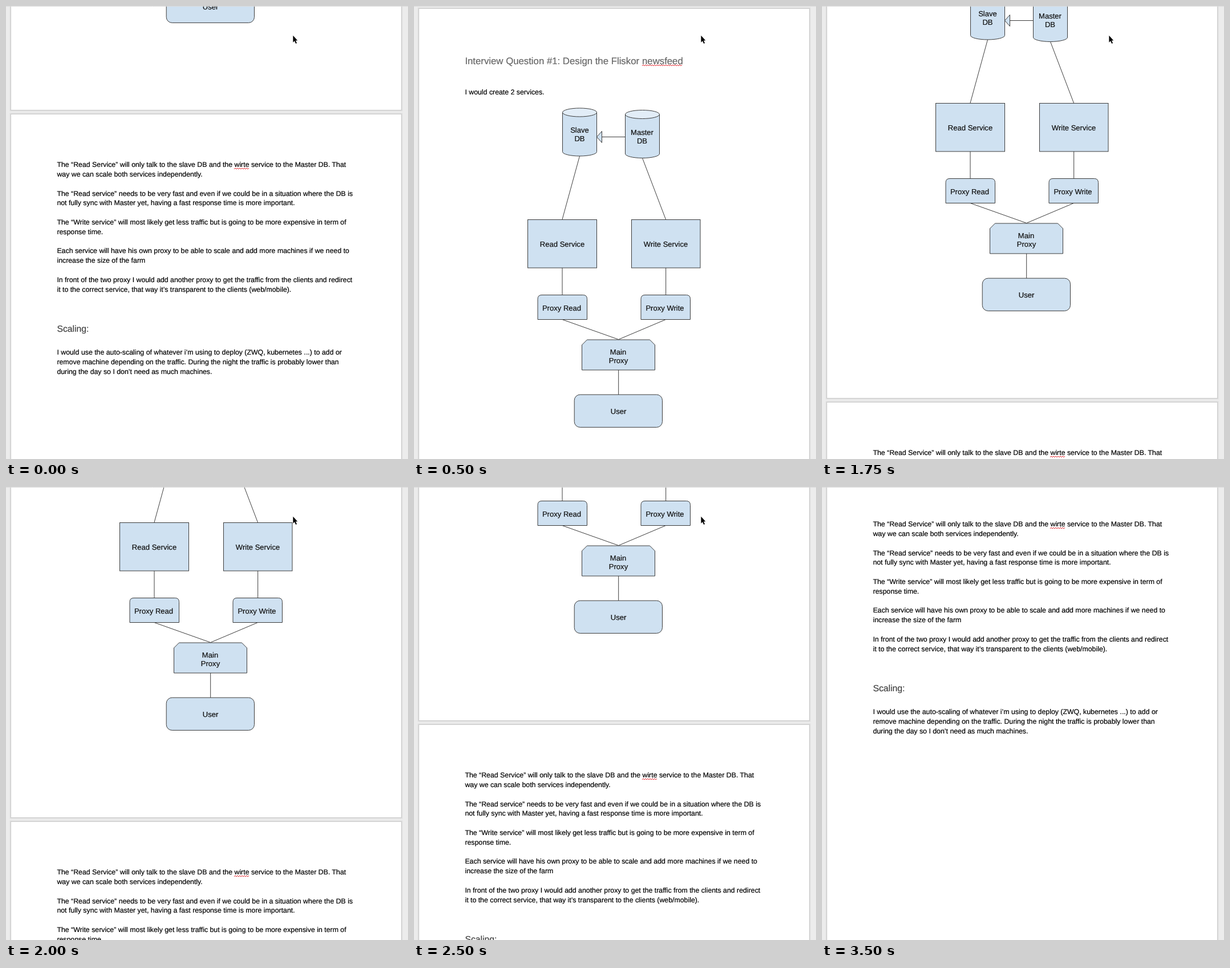
Animation of 705 by 794 pixels, one loop 4.25 s. Source, as an HTML page:

```html
<!DOCTYPE html>
<html lang="en">
<head>
<meta charset="utf-8">
<title>Scrolling design document</title>
<style>
  html, body { margin: 0; width: 100%; height: 100%; overflow: hidden; background: #ececec; }
  svg { display: block; width: 705px; height: 794px; }
  text {
    font: 12.33px "Liberation Sans", Arial, sans-serif;
    text-rendering: geometricPrecision;
    color: #000;
    fill: currentColor;
    stroke: currentColor;
    stroke-width: .2px;
  }
  .title { font-size: 16.78px; color: #666; }
  .heading { font-size: 15.75px; color: #434343; }
  .label { font-size: 13.05px; color: #111; text-anchor: middle; }
  .halo { fill: none; stroke: #dedede; stroke-width: 4; }
  .page { fill: #fff; stroke: #cbcbcb; }
  .shapes { fill: #cfe1f1; stroke: #3c3c3c; }
  .links { fill: none; }
  .lid { fill: #e2edf7; }
  .squiggle { fill: none; stroke: #e3242b; stroke-width: 1; }
  #doc { animation: scroll 4250ms step-end infinite; }
  #cursor { animation: hide 4250ms step-end infinite; }
  @keyframes scroll {
    0% { transform: translateY(-709px); }
    5.88% { transform: translateY(-337px); }
    11.76% { transform: translateY(0); }
    29.41% { transform: translateY(-22px); }
    35.29% { transform: translateY(-84px); }
    41.17% { transform: translateY(-204px); }
    47.05% { transform: translateY(-312px); }
    52.94% { transform: translateY(-400px); }
    58.82% { transform: translateY(-482px); }
    64.70% { transform: translateY(-716px); }
    70.58% { transform: translateY(-855px); }
    76.47% { transform: translateY(-916px); }
    82.35%, 100% { transform: translateY(-922px); }
  }
  @keyframes hide {
    0% { visibility: visible; }
    82.35%, 100% { visibility: hidden; }
  }
</style>
</head>
<body>
<svg viewBox="0 0 705 794">
  <g id="doc">
    <rect class="halo" x="8.5" y="4.5" width="685" height="887"/>
    <rect class="page" x="8.5" y="4.5" width="685" height="887"/>
    <rect class="halo" x="8.5" y="898.5" width="685" height="887"/>
    <rect class="page" x="8.5" y="898.5" width="685" height="887"/>

    <g class="shapes">
      <path class="links" d="M290.5 263 260 374M400.5 266.5 441.5 374M260 459V506M441.7 459V506
               M260 549.5 358.7 584.5 441.5 549.5M358.7 638V681M330 229.5H370"/>
      <path id="drum" d="M260.5 186.5V255.5A30 7.5 0 0 0 320.5 255.5V186.5"/>
      <ellipse id="lid" class="lid" cx="290.5" cy="186.5" rx="30" ry="7.5"/>
      <use href="#drum" x="110" y="3.5"/>
      <use href="#lid" x="110" y="3.5"/>
      <path d="M320.5 229.5 329.5 219.5V239.5Z"/>
      <rect x="199.5" y="374.5" width="121" height="84.5"/>
      <rect x="381.5" y="374.5" width="120.5" height="84.5"/>
      <path id="proxy" d="M217 549.5V513.5Q217 506.5 224 506.5H296.5Q303.5 506.5 303.5 513.5V549.5Z"/>
      <use href="#proxy" x="181"/>
      <path d="M294.5 638V594L303.5 585H413.5L422.5 594V638Z"/>
      <rect x="281.2" y="681.2" width="154.3" height="57.2" rx="10"/>
    </g>
  </g>

  <path d="M0 .5H705" stroke="#dadada"/>
  <path id="cursor" d="M503.4 51.8V63.7L506.1 61.2 508.2 65.9 510 65.1 508 60.5H511.3Z"
        stroke="#fff" stroke-width="1" paint-order="stroke"/>
</svg>

<script>
  const doc = document.getElementById('doc');
  const LEFT = 89.4;

  function add(tag, attrs, content = '') {
    const el = document.createElementNS('http://www.w3.org/2000/svg', tag);
    for (const key in attrs) el.setAttribute(key, attrs[key]);
    el.textContent = content;
    doc.append(el);
  }

  const write = (content, x, y, type = 'body') => add('text', { x, y, class: type }, content);

  function writeLines(lines, top, step) {
    lines.forEach((line, i) => line && write(line, LEFT, Math.round(top + i * step)));
  }

  function squiggle(from, to, y) {
    let d = `M${from} ${y + 2}`;
    for (let x = from + 2, up = true; x <= to; x += 2, up = !up) d += `L${x} ${up ? y : y + 2}`;
    add('path', { d, class: 'squiggle' });
  }

  write('Interview Question #1: Design the Fliskor', LEFT, 102, 'title');
  write('newsfeed', 400, 102, 'title');
  squiggle(400, 471, 103);
  write('I would create 2 services.', LEFT, 155);

  [
    ['Slave', 290.5, 222], ['DB', 290.5, 237],
    ['Master', 400, 226], ['DB', 400, 241],
    ['Read Service', 260, 421.5], ['Write Service', 441.5, 421.5],
    ['Proxy Read', 259, 533.5], ['Proxy Write', 440, 533.5],
    ['Main', 358, 611], ['Proxy', 358.5, 626],
    ['User', 358.5, 714.5]
  ].forEach(([name, x, y]) => write(name, x, y, 'label'));

  writeLines([
    'The “Read Service” will only talk to the slave DB and the wirte service to the Master DB. That',
    'way we can scale both services independently.',
    '',
    'The “Read service” needs to be very fast and even if we could be in a situation where the DB is',
    'not fully sync with Master yet, having a fast response time is more important.',
    '',
    'The “Write service” will most likely get less traffic but is going to be more expensive in term of',
    'response time.',
    '',
    'Each service will have his own proxy to be able to scale and add more machines if we need to',
    'increase the size of the farm',
    '',
    'In front of the two proxy I would add another proxy to get the traffic from the clients and redirect',
    'it to the correct service, that way it’s transparent to the clients (web/mobile).'
  ], 991.25, 16.8);
  squiggle(400, 426, 993);

  write('Scaling:', LEFT, 1280, 'heading');
  writeLines([
    'I would use the auto-scaling of whatever i’m using to deploy (ZWQ, kubernetes ...) to add or',
    'remove machine depending on the traffic. During the night the traffic is probably lower than',
    'during the day so I don’t need as much machines.'
  ], 1320, 17);
</script>
</body>
</html>
```
